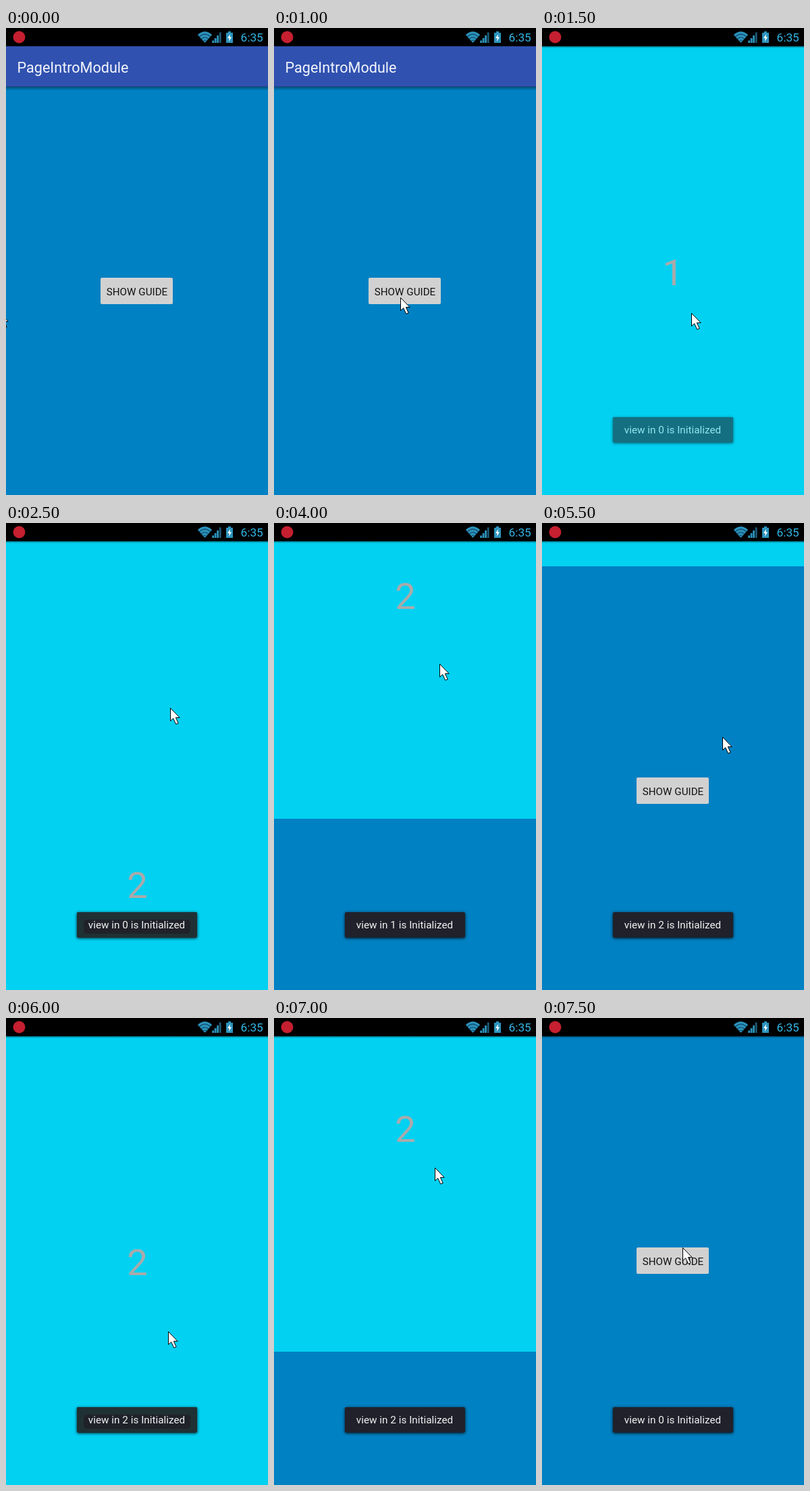
Recreate the animation shown at these times as an HTML page. Size 388x690 px, loop 8 s.

```html
<!DOCTYPE html>
<html lang="en">
<head>
<meta charset="utf-8">
<title>Page guide</title>
<style>
  html, body { margin: 0; width: 100%; height: 100%; overflow: hidden; background: #0081c3; }
  svg { display: block; width: 388px; height: 690px; font-family: Roboto, sans-serif; }
  .mid { text-anchor: middle; }
  .small { font-size: 15.2px; }
  .digit { font-size: 54.5px; fill: #aaa; }
</style>
</head>
<body>
<svg viewBox="0 0 388 690">
  <defs>
    <linearGradient id="fade" x2="0" y2="1">
      <stop stop-opacity=".4"/>
      <stop offset="1" stop-opacity="0"/>
    </linearGradient>
  </defs>
  <rect width="388" height="690" fill="#0081c3"/>

  <g id="home">
    <rect x="140" y="312" width="107" height="39" rx="2" fill="#d1d1d1"/>
    <text x="194" y="337.8" class="mid small" fill="#111">SHOW GUIDE</text>
  </g>

  <g id="header">
    <rect y="27" width="388" height="60" fill="#3051b0"/>
    <rect y="86.5" width="388" height="6" fill="url(#fade)"/>
    <text x="16.5" y="66" font-size="21.6" fill="#f4f6fb">PageIntroModule</text>
  </g>

  <g id="pages">
    <rect y="27" width="388" height="1326" fill="#02d1f2"/>
    <text x="193.8" y="379.8" class="mid digit">1</text>
    <text x="194.5" y="1042.8" class="mid digit">2</text>
  </g>

  <g id="toast">
    <rect x="105" y="575" width="178" height="37.5" rx="2" fill="#20212b"
      style="filter: drop-shadow(0 1px 2px rgba(0,0,0,.85))"/>
    <g id="rim">
      <rect x="105" y="575" width="178" height="37.5" rx="2" fill="#203135"/>
      <rect id="inset" x="115" y="586" width="158" height="21" rx="5" fill="#20222a"/>
    </g>
    <text id="note" x="193.5" y="599.2" class="mid" font-size="15.3" fill="#f2f2f2"></text>
  </g>

  <rect id="edge" y="27" width="388" height="3" fill="url(#fade)"/>
  <rect width="388" height="27" fill="#000"/>
  <circle cx="19.5" cy="13.5" r="9" fill="#c51f30"/>
  <path d="M284 10.5Q294.5 1.5 305 10.5L294.5 22Z" fill="#15587a"/>
  <g fill="none" stroke="#2c94bd" stroke-width="2.8">
    <path d="M285 11Q294.5 2.6 304 11M288 14.4Q294.5 8.6 301 14.4M291 17.6Q294.5 14.4 298 17.6"/>
    <path d="M292.4 19L294.5 21.5L296.6 19Z" fill="#2c94bd" stroke="none"/>
  </g>
  <g fill="#2c94bd">
    <path d="M305.2 18.5h2.8v3.5h-2.8zM308.7 15h2.8v7h-2.8zM312.2 11h2.8v11h-2.8z"/>
    <path d="M315.8 6.5h2.8v15.5h-2.8z" fill="#1c5c76"/>
    <path d="M329 5h4v2h3v15h-10V7h3z"/>
    <path d="M332 9L328 15h2.6L330 20L334 13.6h-2.6z" fill="#fff"/>
  </g>
  <text x="347.5" y="20" font-size="17.3" fill="#33b5e5">6:35</text>

  <path id="cursor" d="M.5 .5V19.5L4.7 15.7L8.7 24.3L12.2 23L8.4 14.6H14.2Z" fill="#fff" stroke="#000"/>
</svg>
<script>
const STEP = 500, TOP = 27, PAGE = 663;
const $ = id => document.getElementById(id);
const move = (id, x, y) => $(id).setAttribute("transform", `translate(${x} ${y})`);
const show = (id, on) => $(id).style.display = on ? "" : "none";

// cursor x, cursor y, scroll of the guide (absent: closed), number in the toast
const poses = [
  [-11, 419], [183, 404], [187, 398],
  [221, 421, 0, 0], [230, 480, 0, 0], [243, 273, 489, 0],
  [232, 368, PAGE, 0], [240, 461, PAGE, 1], [245, 208, PAGE + 253, 1],
  [250, 170, 2 * PAGE - 3, 1], [262, 279, 2 * PAGE, 1], [267, 316, 2 * PAGE - 37, 2],
  [240, 463, PAGE, 2], [236, 418, PAGE, 2], [238, 221, PAGE + 197, 2],
  [208, 339, 2 * PAGE, 0]
];
const opening = poses.findIndex(pose => pose.length > 2);

let last = -1;
function draw(now) {
  const i = Math.floor(now / STEP) % poses.length;
  if (i !== last) {
    last = i;
    const [x, y, scroll, page] = poses[i];
    const open = scroll !== undefined;
    const homeTop = open ? TOP + 2 * PAGE - scroll : TOP + 30;
    const fading = i === opening;
    move("cursor", x, y);
    move("home", 0, homeTop);
    move("pages", 0, -(scroll || 0));
    show("header", !open);
    for (const id of ["pages", "edge", "toast"]) show(id, open);
    show("rim", homeTop > 613);
    show("inset", !fading);
    $("note").textContent = `view in ${page} is Initialized`;
    $("toast").style.opacity = fading ? .6 : 1;
  }
  requestAnimationFrame(draw);
}
draw(0);
</script>
</body>
</html>
```
